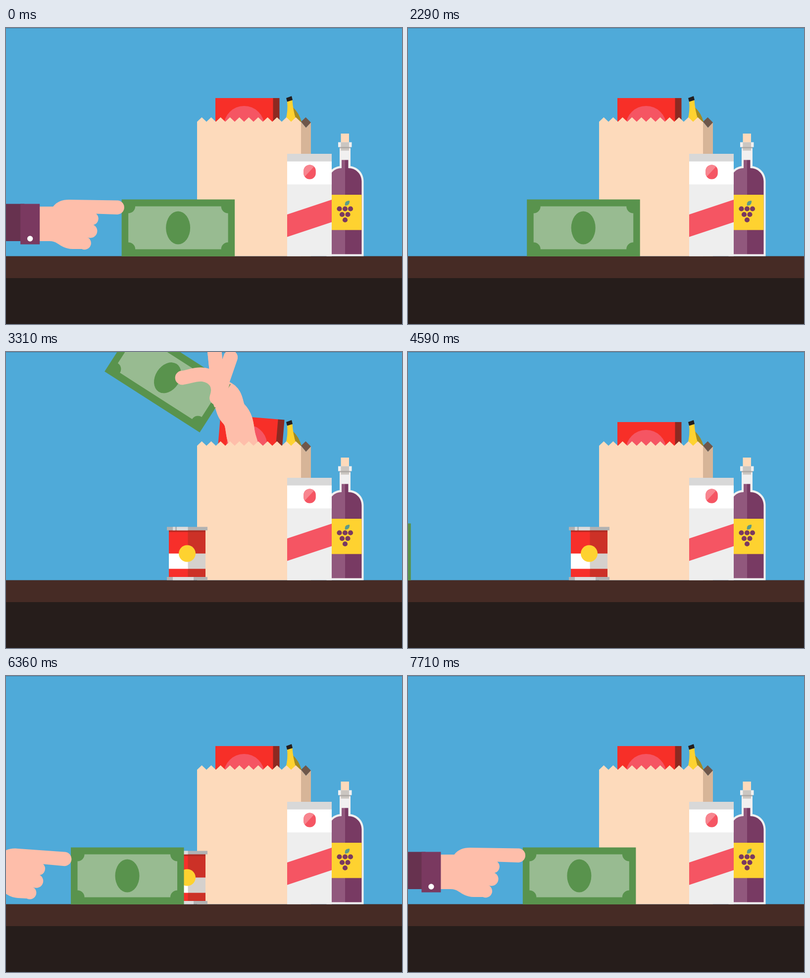
Animation of 800x600 px, one loop 7740 ms. Source, as an HTML page:

```html
<!DOCTYPE html>
<html lang="en">
<head>
<meta charset="utf-8">
<title>Paying for groceries</title>
<style>
  html, body { margin: 0; width: 100%; height: 100%; overflow: hidden; background: #4faad9; }
  svg { display: block; width: 100%; height: 100%; }
  .limb { fill: none; stroke: #febeaa; stroke-linecap: round; stroke-linejoin: round; }
</style>
</head>
<body>
<svg viewBox="0 0 800 600" preserveAspectRatio="none">
  <defs>
    <g id="bill">
      <rect width="228.5" height="115.5" fill="#59934d"/>
      <path fill="#98bb91" d="M27.5 14H201A14 14 0 0 0 215 28V87A14 14 0 0 0 201 101H27.5A14 14 0 0 0 13.5 87V28A14 14 0 0 0 27.5 14Z"/>
      <ellipse cx="114" cy="57.5" rx="24.5" ry="33.5" fill="#59934d"/>
    </g>
    <path id="rearFinger" class="limb" stroke-width="29" d="M0 12C25 12 42 25 43 60"/>
    <g id="frontFingers" class="limb" stroke-width="28.5">
      <path d="M0 10H-77M-20 18L-96 53"/>
      <path d="M10 10C-20 10 -29 30 -26 50C-23 66 -12 76 -6 89"/>
      <path stroke="none" fill="#febeaa" d="M-29 -6H29V8L10 24H-29Z"/>
    </g>
    <clipPath id="outside"><path d="M-50 -200H800V180H432V235H455V600H-50Z"/></clipPath>
    <clipPath id="aboveTable"><path d="M0 -200H800V462H0Z"/></clipPath>
    <clipPath id="emblem"><rect x="601.3" y="277.5" width="24.5" height="29" rx="12"/></clipPath>
    <clipPath id="wine"><path d="M678 267.5H691.5V284C707 284 718.5 296 718.5 311V458.5H651.5V311C651.5 296 663 284 678 284Z"/></clipPath>
  </defs>

  <rect width="800" height="600" fill="#4faad9"/>
  <rect width="800" height="1" fill="#3f86ab"/>
  <rect y="462.5" width="800" height="45" fill="#462b25"/>
  <rect y="507" width="800" height="93" fill="#261d1b"/>

  <g id="box">
    <rect x="423" y="142" width="117" height="100" fill="#f72f28"/>
    <path fill="#f55563" d="M440 199A41 41 0 0 1 522 199V240H440Z"/>
    <rect x="539.5" y="142" width="13" height="100" fill="#8d2921"/>
  </g>

  <path fill="#a38a22" d="M579 160Q592 172 597 190H580Z"/>
  <path fill="#fed230" d="M568 149L578.5 146Q579.5 165 586 186V200H565V186Q570 168 568 149Z"/>
  <path fill="#231f20" d="M566 142L577 138L579 146L568 149.5Z"/>

  <g id="inner" clip-path="url(#aboveTable)"></g>

  <g id="bag">
    <path id="bagFront" fill="#fddabb"/>
    <path fill="#d7b598" d="M596 190L606 202L616 191V462.5H596Z"/>
    <path fill="#6f574a" d="M605.5 181L616 191.5L606 202L596 190Z"/>
  </g>

  <g id="can">
    <path fill="#f72f2a" d="M329 361H368V456.5H329Z"/>
    <path fill="#cc3127" d="M367.5 361H403V456.5H367.5Z"/>
    <path fill="#a82a22" d="M329 361H403V365H329Z" opacity=".75"/>
    <path fill="#fff" d="M329 408.5H368V439.5H329Z"/>
    <path fill="#d5d1cd" d="M367.5 408.5H403V439.5H367.5Z"/>
    <circle cx="366" cy="408.5" r="17" fill="#fed230"/>
    <path fill="#b2b2b2" d="M325 354.5H407V361.5H325ZM325 456H407V462.5H325Z"/>
    <path fill="#dcdcdc" d="M337 354.5H342V361.5H337ZM345 354.5H367.5V361.5H345ZM337 456H379V462.5H337Z"/>
  </g>

  <g id="bottle">
    <path fill="#f1f0f0" d="M674 241H696V280C711 282 722.5 294 722.5 311V462.5H647.5V311C647.5 294 659 282 674 280Z"/>
    <g clip-path="url(#wine)">
      <rect x="640" y="260" width="45" height="205" fill="#91587d"/>
      <rect x="685" y="260" width="40" height="205" fill="#783a63"/>
      <rect x="640" y="338" width="90" height="71.5" fill="#fed230"/>
    </g>
    <rect x="676.5" y="214" width="16.5" height="18" fill="#fddabb"/>
    <rect x="671" y="231.5" width="27.5" height="10" fill="#f1f0f0"/>
    <rect x="676.5" y="231.5" width="16.5" height="17" fill="#cbc6c1"/>
    <rect x="674" y="241" width="22" height="3" fill="#a8a3a0" opacity=".75"/>
    <g id="grapes" fill="#7a3960"></g>
    <path fill="#5b9a8a" d="M685 360Q683 350 694 350Q695 360 685 360Z"/>
  </g>

  <g id="carton">
    <rect x="568" y="255" width="90" height="207.5" fill="#eee"/>
    <rect x="568" y="270" width="90" height="47" fill="#fff"/>
    <rect x="568" y="255" width="90" height="15.5" fill="#d8d8d8"/>
    <path fill="#f55563" d="M568 378L658 348V393.5L568 423.5Z"/>
    <g clip-path="url(#emblem)">
      <rect x="600" y="276" width="28" height="32" fill="#f55563"/>
      <path fill="#f8858f" d="M600 276H627L600 305Z"/>
    </g>
  </g>

  <g id="outer" clip-path="url(#outside)"></g>

  <g id="payer">
    <rect x="-700" y="356.5" width="737" height="75.5" fill="#67324f"/>
    <path fill="#febeaa" d="M66 362H95C103 352 113 348 127 348L226 349.5A14.3 14.3 0 0 1 225 378L182 376.5A13 13 0 0 1 176.500 399A13 13 0 0 1 164 424A12.500 12.500 0 0 1 153 448H135C119 448 111 441 104 437Q97 432 88 432H66Z"/>
    <rect x="29" y="356.5" width="39" height="82" fill="#7a3960"/>
    <circle cx="48.5" cy="427" r="5.7" fill="#fff"/>
  </g>
</svg>
<script>
const LOOP = 7740, BILL_Y = 347.5, REST_X = 240.2, PAUSE_X = 131;
const $ = id => document.getElementById(id);
const move = (el, value) => el.setAttribute('transform', value);
const show = (el, on) => el.setAttribute('visibility', on ? 'visible' : 'hidden');
const unit = (t, a, b) => Math.min(1, Math.max(0, (t - a) / (b - a)));
const smooth = (t, a, b) => { const u = unit(t, a, b); return u * u * (3 - 2 * u); };

// Toothed upper edge of the bag
let edge = 'M386 462.5V190';
for (let x = 386; x < 595; x += 19) edge += `L${x + 9.5} 181L${x + 19} 190`;
$('bagFront').setAttribute('d', edge + 'H596V462.5Z');

$('grapes').innerHTML = [[673.5, 366.5], [685, 366.5], [696, 366.5], [679, 378], [690.5, 378], [685, 389]]
  .map(([x, y]) => `<circle cx="${x}" cy="${y}" r="5.1"/>`).join('');

// The reaching arm is drawn behind the bag and again in front of it
const layers = ['inner', 'outer'].map(id => {
  const g = $(id);
  g.innerHTML = `<path class="limb" style="stroke-linecap:butt" stroke-width="58"/>
    <use href="#rearFinger"/><use href="#bill"/><use href="#frontFingers"/>`;
  const [arm, rear, bill, front] = g.children;
  return { arm, rear, bill, front };
});

// Arm poses: base, apex, elbow, wrist, each as x, y, heading
const poses = [
  [[490, 560, -90], [490, 520, -90], [490, 480, -90], [490, 440, -90]],
  [[490, 300, -90], [488, 240, -92], [484, 190, -95], [478, 112, -98]],
  [[490, 250, -95], [462, 150, -130], [430, 108, -185], [397, 125, -230]],
  [[490, 235, -100], [434, 159, -180], [386, 210, -270], [385, 300, -270]]
];

function spline(a, b, c, d, u) {
  return b + u / 2 * (c - a + u * (2 * a - 5 * b + 4 * c - d + u * (3 * (b - c) + d - a)));
}

function poseAt(p) {
  const i = Math.min(2, Math.floor(p));
  const at = k => poses[Math.min(3, Math.max(0, k))];
  return poses[0].map((node, n) => node.map((_, k) =>
    spline(at(i - 1)[n][k], at(i)[n][k], at(i + 1)[n][k], at(i + 2)[n][k], p - i)));
}

function armPath(nodes) {
  let d = `M${nodes[0][0]} ${nodes[0][1]}`;
  for (let i = 1; i < nodes.length; i++) {
    const [ax, ay, aa] = nodes[i - 1], [bx, by, ba] = nodes[i];
    const h = 0.39 * Math.hypot(bx - ax, by - ay), rad = Math.PI / 180;
    d += `C${ax + h * Math.cos(aa * rad)} ${ay + h * Math.sin(aa * rad)} ` +
         `${bx - h * Math.cos(ba * rad)} ${by - h * Math.sin(ba * rad)} ${bx} ${by}`;
  }
  return d;
}

const push = (t, start, span, from, to, power) =>
  to - (to - from) * Math.pow(1 - unit(t, start, start + span), power);

function billX(t) {
  if (t < 1020) t += LOOP;
  if (t < 4575) return REST_X;
  return t < 6900 ? push(t, 4575, 1693, -229, PAUSE_X, 1.85)
                  : push(t, 6900, 1040, PAUSE_X, REST_X, 1.7);
}

function drawPayer(t, x) {
  const away = t > 1020 && t < 4575;
  const back = t < 4575 ? 260 * smooth(t, 200, 1010)
                        : 48 * (smooth(t, 6300, 6600) - smooth(t, 6600, 6900));
  const tilt = 7 * (smooth(t, 6250, 6480) - smooth(t, 6600, 6880));
  show($('payer'), !away);
  move($('payer'), `translate(${x - 233.5 - back} 0) rotate(${tilt} 100 390)`);
}

function drawTaker(t, x) {
  const p = 3 * (smooth(t, 2170, 2750) - smooth(t, 2950, 3670));
  const nodes = poseAt(p), [wx, wy, heading] = nodes[3];
  const wrist = `translate(${wx} ${wy}) rotate(${heading + 270})`;
  const held = t >= 2930 && t < 3670, gone = t >= 3670 && t < 4575;
  const twist = -90 * (1 - smooth(p, 1, 3));
  const place = held ? `${wrist} rotate(${twist} -6 89) translate(-144.8 47.5)`
                     : `translate(${x} ${BILL_Y})`;
  const d = armPath(nodes);
  layers.forEach(({ arm, rear, bill, front }, i) => {
    const on = i ? p >= 1 : p > 0;
    arm.setAttribute('d', d);
    move(rear, wrist);
    move(front, wrist);
    move(bill, place);
    [arm, rear, front].forEach(el => show(el, on));
    show(bill, !gone && (i ? !(held && p < 1) : held && p < 1));
  });
  // The bill must not be cut off while it lies outside the bag
  if (p < 1) $('outer').removeAttribute('clip-path');
  else $('outer').setAttribute('clip-path', 'url(#' + (p > 2.2 || !held ? 'outsideWide' : 'outside') + ')');
}

// Lets the bill itself show in full while the arm stays clipped
function splitClip() {
  const { arm, rear, front } = layers[1];
  const wrap = el => {
    const g = document.createElementNS('http://www.w3.org/2000/svg', 'g');
    g.setAttribute('clip-path', 'url(#outside)');
    el.replaceWith(g);
    g.append(el);
  };
  [arm, rear, front].forEach(wrap);
  $('outer').removeAttribute('clip-path');
}

function draw(t) {
  const x = billX(t);
  drawPayer(t, x);
  drawTaker(t, x);
  $('outer').removeAttribute('clip-path');
  const lean = 4.9 * (smooth(t, 2300, 2680) - smooth(t, 3280, 3620));
  move($('box'), `rotate(${lean} 611 260)`);
  const u = unit(t, 3330, 3670);
  const sway = 0.55 * Math.sin(u * Math.PI * 3) * (1 - u);
  move($('bag'), `translate(0 462.5) skewX(${sway}) translate(0 -462.5)`);
}

splitClip();
const begin = performance.now();
function tick() {
  draw((performance.now() - begin) % LOOP);
  requestAnimationFrame(tick);
}
tick();
</script>
</body>
</html>
```
